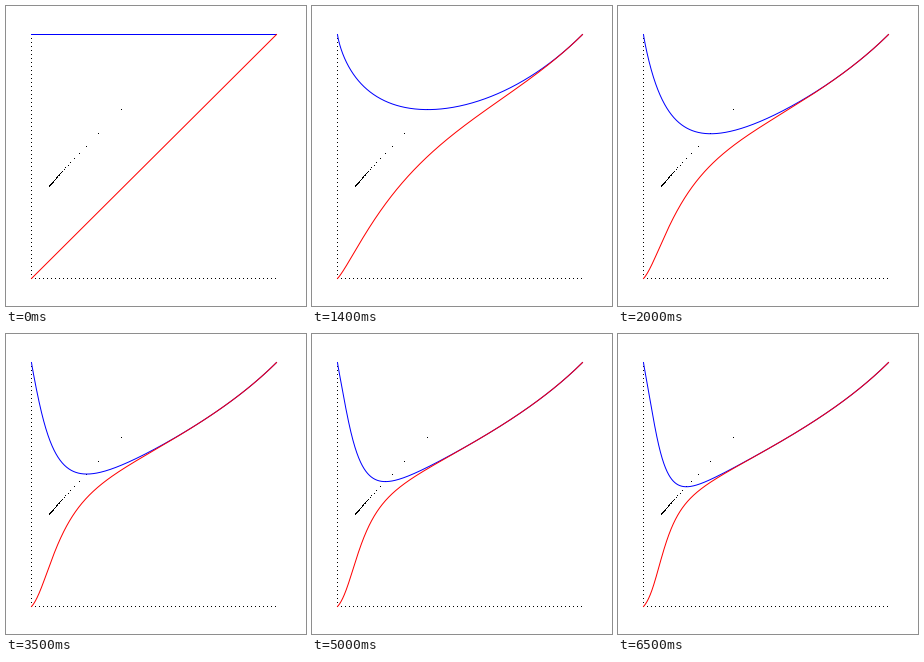
A matplotlib script that plays this animation: 300x300 px, repeating every 8 s.

```python
import numpy as np
import matplotlib.pyplot as plt
from matplotlib.animation import FuncAnimation
from matplotlib.collections import PatchCollection
from matplotlib.patches import Rectangle

SIZE, DPI = 300, 100
LEFT, RIGHT, TOP, BOTTOM = 25.5, 270.5, 28.5, 272.5
PX = 72 / DPI  # one pixel in points


def tower(x, height):
    """Power tower x^x^...^x of the given height."""
    y = np.ones_like(x)
    for _ in range(height):
        y = x ** y
    return y


def to_px(x, y):
    return LEFT + (RIGHT - LEFT) * x, BOTTOM + (TOP - BOTTOM) * y


def minima(count):
    """Lowest points of the towers of even height."""
    x = np.linspace(0.04, 0.5, 20000)
    y = np.ones_like(x)
    points = []
    for _ in range(count):
        y = x ** (x ** y)
        k = y.argmin()
        points.append((x[k], y[k]))
    return np.array(points).T


fig = plt.figure(figsize=(SIZE / DPI, SIZE / DPI), dpi=DPI, facecolor="white")
ax = fig.add_axes([0, 0, 1, 1])
ax.set(xlim=(0, SIZE), ylim=(SIZE, 0))
ax.axis("off")


def dots(xs, ys):
    """Fill the single pixels that hold the given points."""
    cells = {(int(x), int(y)) for x, y in np.broadcast(xs, ys)}
    squares = [Rectangle(cell, 1, 1) for cell in cells]
    ax.add_collection(PatchCollection(squares, fc="black", lw=0))


# dotted axes
dots(np.arange(LEFT, RIGHT, 4), BOTTOM)
dots(LEFT, np.arange(BOTTOM, TOP, -4))

dots(*to_px(*minima(120)))

blue, = ax.plot([], [], color="blue", lw=PX, snap=False)
red, = ax.plot([], [], color="red", lw=PX, snap=False)
xs = np.linspace(0, 1, 600) ** 1.5


def draw(i):
    n = (i + 2) // 3
    blue.set_data(*to_px(xs, tower(xs, 2 * n)))
    red.set_data(*to_px(xs, tower(xs, 2 * n + 1)))
    return blue, red


anim = FuncAnimation(fig, draw, frames=16, interval=500, repeat=True,
                     repeat_delay=0)
plt.show()
```
